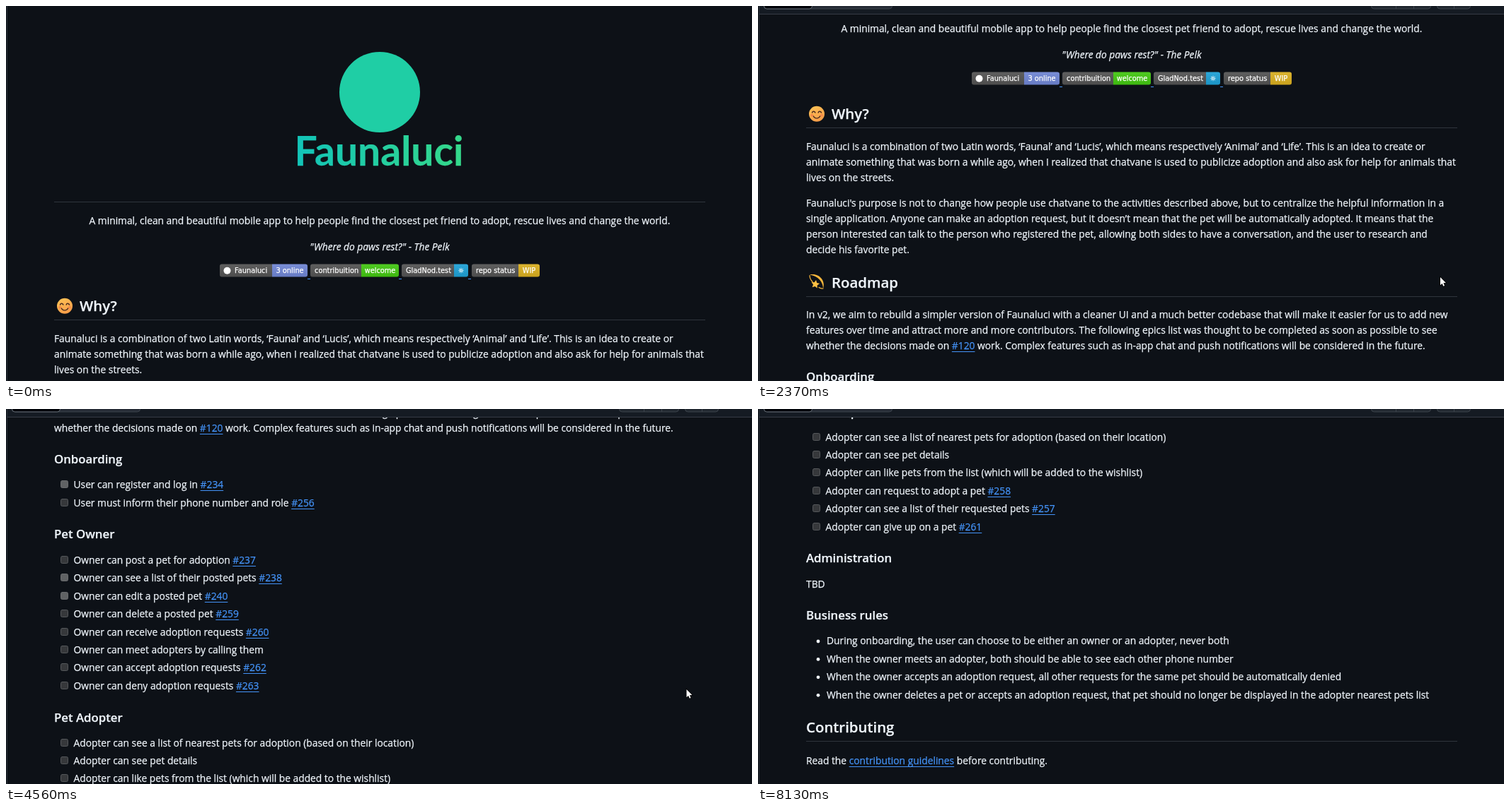
An HTML page with a canvas for the animation above (8.73 s loop, 1054 by 531 pixels).

```html
<!DOCTYPE html>
<html lang="en">
<head>
<meta charset="utf-8">
<title>Readme scroll</title>
<style>
  html, body { margin: 0; width: 100%; height: 100%; overflow: hidden; background: #0d1117; }
  canvas { display: block; }
</style>
</head>
<body>
<canvas id="stage" width="1054" height="531"></canvas>
<script>
const ctx = document.getElementById('stage').getContext('2d');
const W = 1054, H = 531, LOOP = 8730, NOTCH = 90.8, END = 1158.8;
const BG = '#0d1117', INK = '#f0f6fc', LINK = '#4493f8', RULE = '#2f353d';
const SANS = '"Open Sans", "Noto Sans", sans-serif';
const BODY = `13.8px ${SANS}`, H2 = `600 20.4px ${SANS}`, H3 = `600 16.8px ${SANS}`;
const BADGE = '9.8px "DejaVu Sans", sans-serif';
const ROW = 25.43, LEAD = 21.8;

// Times of the wheel notches; the last one reaches the page end
const wheel = [1070, 1960, 2370, 2830, 3230, 3830, 4160, 4560, 4890, 5240, 5510, 5910, 6580];

// Pointer moves: start, end, target x, target y
const moves = [
  [250, 810, 967, 357],
  [1550, 1890, 966.5, 370],
  [1960, 2370, 964, 384],
  [2900, 3230, 961.5, 397],
  [5840, 5840, 962.3, 397],
  [6110, 6180, 966.5, 397],
  [7570, 8130, 1044, 535]
];

const intro = [
  'Faunaluci is a combination of two Latin words, ‘Faunal’ and ‘Lucis’, which means respectively ‘Animal’ and ‘Life’. This is an idea to create or',
  'animate something that was born a while ago, when I realized that chatvane is used to publicize adoption and also ask for help for animals that',
  'lives on the streets.'
];
const purpose = [
  'Faunaluci\'s purpose is not to change how people use chatvane to the activities described above, but to centralize the helpful information in a',
  'single application. Anyone can make an adoption request, but it doesn’t mean that the pet will be automatically adopted. It means that the',
  'person interested can talk to the person who registered the pet, allowing both sides to have a conversation, and the user to research and',
  'decide his favorite pet.'
];
const plan = [
  'In v2, we aim to rebuild a simpler version of Faunaluci with a cleaner UI and a much better codebase that will make it easier for us to add new',
  'features over time and attract more and more contributors. The following epics list was thought to be completed as soon as possible to see',
  'whether the decisions made on #120 work. Complex features such as in-app chat and push notifications will be considered in the future.'
];
// A leading * marks a ticked box
const onboarding = ['*User can register and log in #234', 'User must inform their phone number and role #256'];
const owner = [
  'Owner can post a pet for adoption #237',
  '*Owner can see a list of their posted pets #238',
  '*Owner can edit a posted pet #240',
  'Owner can delete a posted pet #259',
  'Owner can receive adoption requests #260',
  'Owner can meet adopters by calling them',
  'Owner can accept adoption requests #262',
  'Owner can deny adoption requests #263'
];
const adopter = [
  'Adopter can see a list of nearest pets for adoption (based on their location)',
  'Adopter can see pet details',
  'Adopter can like pets from the list (which will be added to the wishlist)',
  'Adopter can request to adopt a pet #258',
  'Adopter can see a list of their requested pets #257',
  'Adopter can give up on a pet #261'
];
const rules = [
  'During onboarding, the user can choose to be either an owner or an adopter, never both',
  'When the owner meets an adopter, both should be able to see each other phone number',
  'When the owner accepts an adoption request, all other requests for the same pet should be automatically denied',
  'When the owner deletes a pet or accepts an adoption request, that pet should no longer be displayed in the adopter nearest pets list'
];

function rect(x, y, w, h, color) {
  ctx.fillStyle = color;
  ctx.fillRect(x, y, w, h);
}

function round(x, y, w, h, r, fill, line) {
  ctx.beginPath();
  ctx.roundRect(x, y, w, h, r);
  if (fill) { ctx.fillStyle = fill; ctx.fill(); }
  if (line) { ctx.strokeStyle = line; ctx.lineWidth = 1; ctx.stroke(); }
}

function disc(x, y, r, color) {
  ctx.beginPath();
  ctx.arc(x, y, r, 0, 7);
  ctx.fillStyle = color;
  ctx.fill();
}

function arc(x, y, r, from, to) {
  ctx.beginPath();
  ctx.arc(x, y, r, from * Math.PI, to * Math.PI);
  ctx.stroke();
}

// A hairline outline gives the glyphs a slightly heavier weight
function text(str, x, y, font = BODY, color = INK, align = 'left') {
  ctx.font = font;
  ctx.fillStyle = ctx.strokeStyle = color;
  ctx.textAlign = align;
  ctx.lineWidth = .25;
  ctx.lineJoin = 'round';
  ctx.fillText(str, x, y);
  ctx.strokeText(str, x, y);
}

function rich(str, x, y) {
  for (const part of str.split(/(#\d+|contribution guidelines)/)) {
    const link = /^(#|contribution g)/.test(part);
    text(part, x, y, BODY, link ? LINK : INK);
    const w = ctx.measureText(part).width;
    if (link) rect(x, Math.round(y + 3), w, 1, LINK);
    x += w;
  }
}

function para(lines, y) {
  lines.forEach((s, i) => rich(s, 68, y + i * LEAD));
}

function tasks(items, y) {
  items.forEach((s, i) => {
    const base = y + i * ROW, done = s[0] === '*';
    round(77.5, Math.round(base - 11) + .5, 10, 10, 2, done ? '#606264' : '#36383b', done ? '#6a6c6e' : '#55585b');
    rich(done ? s.slice(1) : s, 95.5, base);
  });
}

function bullets(items, y) {
  items.forEach((s, i) => {
    disc(85, y + i * ROW - 4.3, 2.4, INK);
    text(s, 97, y + i * ROW);
  });
}

function rule(y) {
  rect(68, Math.round(y), 920, 1, RULE);
}

function badge(x, split, end, label, value, color, pad = 6) {
  ctx.save();
  ctx.beginPath();
  ctx.roundRect(x, 365.5, end - x, 18, 3);
  ctx.clip();
  rect(x, 365, split - x, 19, '#555');
  rect(split, 365, end - split, 19, color);
  const shade = ctx.createLinearGradient(0, 365, 0, 384);
  shade.addColorStop(0, 'rgba(187,187,187,.1)');
  shade.addColorStop(1, 'rgba(0,0,0,.1)');
  rect(x, 365, end - x, 19, shade);
  ctx.restore();
  text(label, x + pad, 378.3, BADGE, '#fff');
  text(value, (split + end) / 2, 378.3, BADGE, '#fff', 'center');
}

function smiley(x, y) {
  const g = ctx.createLinearGradient(x - 6, y - 11, x + 6, y + 11);
  g.addColorStop(0, '#ffc255');
  g.addColorStop(1, '#f59a48');
  disc(x, y, 11, g);
  disc(x - 6.8, y + 2, 2, '#f58a4a');
  disc(x + 6.8, y + 2, 2, '#f58a4a');
  ctx.strokeStyle = '#4a2b20';
  ctx.lineWidth = 1.4;
  ctx.lineCap = 'round';
  arc(x - 4.3, y - 1, 2.3, 1.1, 1.9);
  arc(x + 4.3, y - 1, 2.3, 1.1, 1.9);
  arc(x, y + 1, 5.2, .15, .85);
}

function dizzy(x, y) {
  ctx.fillStyle = '#f7b63c';
  ctx.beginPath();
  ctx.moveTo(x - 10, y - 10);
  ctx.bezierCurveTo(x + 3, y - 13, x + 13, y - 2, x + 9, y + 10);
  ctx.bezierCurveTo(x + 9, y, x + 2, y - 8, x - 10, y - 10);
  ctx.fill();
  ctx.strokeStyle = '#f7b63c';
  ctx.lineCap = 'round';
  ctx.lineWidth = 1.2;
  ctx.beginPath();
  ctx.moveTo(x - 10, y - 9);
  ctx.quadraticCurveTo(x - 10, y - 4, x - 6, y);
  ctx.moveTo(x + 9, y + 9.5);
  ctx.quadraticCurveTo(x + 6, y + 10, x + 3, y + 8);
  ctx.stroke();
  ctx.beginPath();
  for (let i = 0; i < 10; i++) {
    const r = i % 2 ? 3 : 6.2, a = i * Math.PI / 5 - 1.4;
    ctx.lineTo(x - 2 + r * Math.cos(a), y + 3.5 + r * Math.sin(a));
  }
  ctx.closePath();
  ctx.fillStyle = '#ffc043';
  ctx.fill();
}

function chain(x, y) {
  ctx.save();
  ctx.translate(x, y);
  ctx.rotate(-Math.PI / 4);
  ctx.strokeStyle = INK;
  ctx.lineWidth = 1.4;
  ctx.lineCap = 'round';
  for (const side of [1, -1]) {
    ctx.beginPath();
    ctx.moveTo(side * -1.5, side * 1.2);
    ctx.arc(side * .6, 0, 2.9, side > 0 ? 2.6 : -.55, side > 0 ? 4.7 : 1.55);
    ctx.arc(side * 4.2, 0, 2.9, side > 0 ? -1.57 : 1.57, side > 0 ? 1.57 : 4.71);
    ctx.lineTo(side * 3, side * 2.9);
    ctx.stroke();
  }
  ctx.restore();
}

function page() {
  disc(528, 122, 57, '#1fcea5');
  const g = ctx.createLinearGradient(409, 0, 645, 0);
  g.addColorStop(0, '#12c4b8');
  g.addColorStop(1, '#35d98a');
  text('Faunaluci', 527, 226, '700 57px Lato, sans-serif', g, 'center');
  rule(277);
  text('A minimal, clean and beautiful mobile app to help people find the closest pet friend to adopt, rescue lives and change the world.', 528, 309.3, BODY, INK, 'center');
  text('"Where do paws rest?" - The Pelk', 528, 345.8, 'italic ' + BODY, INK, 'center');
  badge(302, 376, 426, 'Faunaluci', '3 online', '#7289da', 21);
  disc(312.5, 374.7, 5, '#fff');
  badge(430, 502, 555, 'contribuition', 'welcome', '#44cc11');
  badge(559, 633, 653, 'GladNod.test', '☼', '#1ea5dc');
  badge(658, 724, 754, 'repo status', 'WIP', '#dfb320');
  for (const x of [426, 555, 653]) rect(x, 386, 4, 1, LINK);

  smiley(83, 424.7);
  text('Why?', 104, 432.3, H2);
  rule(444.4);
  para(intro, 476);
  para(purpose, 556.2);
  dizzy(83, 662.5);
  text('Roadmap', 104, 670.8, H2);
  rule(682.5);
  para(plan, 714.3);
  text('Onboarding', 68, 803.3, H3);
  tasks(onboarding, 838.3);
  text('Pet Owner', 68, 909.3, H3);
  tasks(owner, 944.8);
  text('Pet Adopter', 68, 1168.9, H3);
  tasks(adopter, 1203.6);
  text('Administration', 68, 1376.3, H3);
  text('TBD', 68, 1411.6);
  text('Business rules', 68, 1457, H3);
  bullets(rules, 1492.3);
  text('Contributing', 68, 1617.3, H2);
  rule(1629.4);
  rich('Read the contribution guidelines before contributing.', 68, 1661.6);
}

function header() {
  rect(2, 0, W, 11, '#151b23');
  rect(2, 11, W, 1, '#363c45');
  round(8.5, -10, 181, 14, 4, '#262c36', '#3d444d');
  round(8.5, -10, 68, 14, 4, '#010409', '#656c76');
  for (const [x, w, cuts] of [[866.5, 84, [901, 926]], [959.5, 47, [983]]]) {
    round(x, -10, w, 14, 4, '#212830', '#3d444d');
    for (const c of cuts) rect(c, 0, 1, 4, '#3d444d');
  }
}

function arrow(x, y) {
  const shape = [[0, 0], [0, 11.2], [2.6, 8.9], [4.3, 12.8], [6.1, 12], [4.4, 8.2], [7.9, 8]];
  ctx.beginPath();
  shape.forEach(([dx, dy]) => ctx.lineTo(x + dx, y + dy));
  ctx.closePath();
  ctx.strokeStyle = '#000';
  ctx.lineWidth = 1.4;
  ctx.stroke();
  ctx.fillStyle = '#fff';
  ctx.fill();
}

// The pointer advances in ticks of 70 ms
function pointer(t) {
  let x = 958, y = 540;
  for (const [a, b, tx, ty] of moves) {
    if (t < a) break;
    const p = t >= b ? 1 : (Math.floor((t - a) / 70) + 1) / (Math.round((b - a) / 70) + 1);
    x += (tx - x) * p;
    y += (ty - y) * p;
  }
  return [x, y];
}

function draw(t) {
  const notches = wheel.filter(w => t >= w).length;
  const scroll = Math.min(notches * NOTCH, END);
  const [x, y] = pointer(t);

  rect(0, 0, W, H, BG);
  ctx.save();
  ctx.translate(0, -Math.round(scroll));
  page();
  if (t < 1070 && y > 409 && y < 446) chain(54, 423.5);
  if (t >= 2500 && t < 2900) chain(54, 661.5);
  ctx.restore();
  if (scroll) header();
  rect(1, 0, 1, H, '#2a3038');
  if (y < H) arrow(x, y);
}

function tick() {
  draw(performance.now() % LOOP);
  requestAnimationFrame(tick);
}
tick();
</script>
</body>
</html>
```
